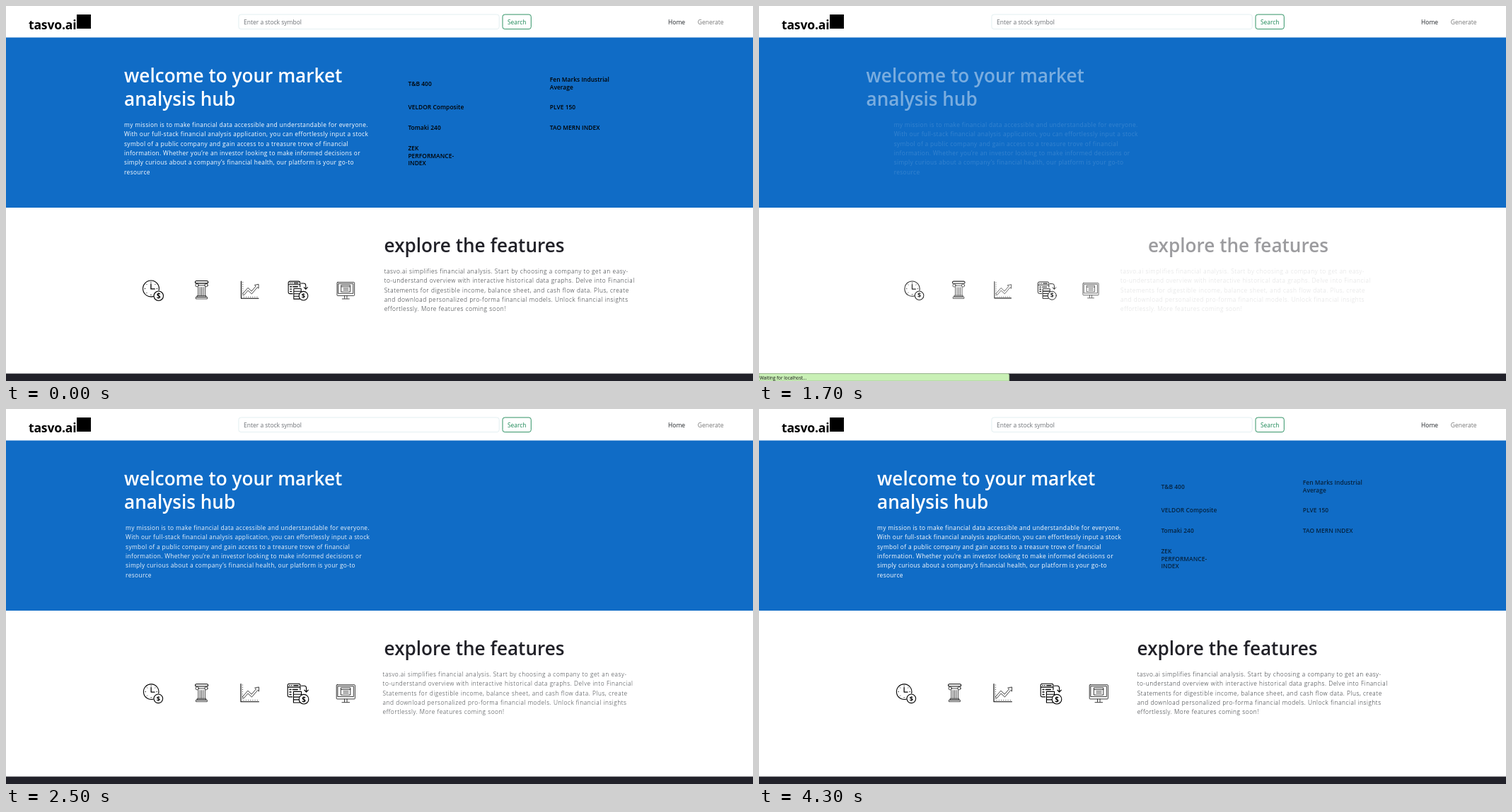
Write an HTML page that moves like this. It is 1056x530 px and loops after 4500 ms.

```html
<!DOCTYPE html>
<html lang="en">
<head>
<meta charset="utf-8">
<title>Market analysis hub</title>
<style>
  html, body { margin: 0; width: 100%; height: 100%; overflow: hidden; background: #fff; }
  svg { display: block; width: 1056px; height: 530px; }
  text { font: 400 8.5px "Open Sans", "Noto Sans", sans-serif; fill: #212529; }
  .brand { font-size: 17.6px; font-weight: 700; letter-spacing: -.2px; fill: #000; }
  .hint { fill: #6c7075; }
  .green { font-size: 8.4px; fill: #198754; }
  .dim { fill: #777; }
  .title { font-size: 26.15px; font-weight: 600; fill: #fff; }
  .dark { fill: #212128; }
  .lead { font-size: 8.4px; letter-spacing: .34px; fill: #fff; }
  .body { font-size: 8.4px; font-weight: 300; letter-spacing: .555px; }
  .label { font-size: 8.4px; font-weight: 600; letter-spacing: .06px; fill: #000; }
  .status { font-size: 6.4px; fill: #111; }
  #icons { fill: none; stroke: #000; stroke-width: 1.1; stroke-linejoin: round; stroke-linecap: round; }
  #icons .thin { stroke-width: .75; }
  #icons .white { fill: #fff; }
  #icons text { font-size: 9.5px; font-weight: 700; fill: #000; stroke: none; text-anchor: middle; }
</style>
</head>
<body>
<svg viewBox="0 0 1056 530">
  <rect width="1056" height="530" fill="#fff"/>
  <rect y="44.5" width="1056" height="240.5" fill="#106cc6"/>
  <rect y="519.5" width="1056" height="10.5" fill="#212129"/>

  <g id="nav">
    <rect x="100" y="12" width="20" height="20" fill="#000"/>
    <rect x="328.9" y="12" width="368.3" height="20.6" rx="3.2" fill="#fff" stroke="#dcebee" stroke-width=".8"/>
    <rect x="702" y="12" width="40.3" height="20.6" rx="3.2" fill="#fff" stroke="#198754" stroke-width=".9"/>
  </g>

  <g id="title"></g>
  <g id="lead"></g>
  <g id="labels"></g>
  <g id="title2"></g>
  <g id="body"></g>

  <g id="icons">
    <g class="icon">
      <path d="M208.4 410.2A11.2 11.2 0 1 1 216 401.8"/>
      <path d="M205 393v7h5.2" stroke-width="1.3"/>
      <path class="thin" d="M205 390.4v1M196.2 399.5h1M212.8 399.5h1M198.8 393.3l.6.6M211.2 393.3l-.6.6M198.8 405.7l.6-.6M205 407.6v1"/>
      <circle cx="215.6" cy="409.6" r="6.6"/>
      <text x="215.6" y="413">$</text>
    </g>
    <g class="icon">
      <path d="M269 388.4h15.2a1.7 1.7 0 0 1 0 3.4H269a1.7 1.7 0 0 1 0-3.4z"/>
      <circle class="thin" cx="270" cy="394.6" r="2.2"/>
      <circle class="thin" cx="283.2" cy="394.6" r="2.2"/>
      <path class="thin" d="M272.2 394.8h8.8M271.6 397v12.2M274.2 397.5v11.7M276.6 397.5v11.7M279 397.5v11.7M281.6 397v12.2"/>
      <path d="M270.3 409.5h12.6v1.9h-12.6zM268.6 411.6h16v2.4h-16z" class="thin"/>
    </g>
    <g class="icon">
      <path d="M332 388.5v25.2h25.4"/>
      <path class="thin" d="M334.4 390v20" stroke-dasharray=".2 3"/>
      <path class="thin" d="M336 411.6h21" stroke-dasharray=".2 3"/>
      <path class="thin" d="M334.3 406.8l7.6-8.6 5.3 5 6.3-7.4-1.8-1.6 5.8-1.2v6l-1.8-1.5-8.2 9.6-5.4-5-5.9 6.6z"/>
    </g>
    <g class="icon">
      <path d="M404.8 406.8h-4a2.2 2.2 0 0 1-2.2-2.2v-13.8a2.2 2.2 0 0 1 2.2-2.2h12.8a2.2 2.2 0 0 1 2.2 2.2v6.2M398.8 393.4h16.8"/>
      <path d="M401.3 391h.2M404 391h.2M407 391h6M401.4 396.6h1.8M405.6 396.6h6.6M401.4 400h1.8M401.4 403.4h1.8" stroke-width="1.5"/>
      <path d="M417.4 391.6h3.8q3 0 3 3v5M421.6 397.4l2.6 2.8 2.6-2.8"/>
      <path class="white" d="M406.6 399.4h10.8v3.8h-10.8zM406.6 403.2h10.8v3.8h-10.8zM406.6 407h9v3.6h-9zM406.6 410.6h8.6v4h-8.6z"/>
      <circle class="white" cx="420.8" cy="410" r="6.6"/>
      <text x="420.8" y="413.4">$</text>
    </g>
    <g class="icon">
      <rect class="thin" x="467.7" y="390.2" width="25.2" height="19.4" rx="1"/>
      <path class="thin" d="M469.7 392.2h21.2v14.2h-21.2z"/>
      <path class="thin" d="M474 394.3h12.6v9.8H474zM474 396.6h12.6M477 399h7M477 401.4h7"/>
      <path class="thin" d="M478.6 409.8v3.6M482 409.8v3.6M475.2 414.2h10.2"/>
    </g>
  </g>

  <g id="status">
    <path d="M0 519.6h351.5q2.3 0 2.3 2.3V530H0z" fill="#c9f0b6" stroke="#8fae83" stroke-width=".6"/>
  </g>
</svg>
<script>
const LOOP = 4500, TICK = 100, LAST = 4300;
const RELOAD = 1500, SHIFT = 27.9;
const $ = id => document.getElementById(id);

function write(id, cls, x, y, step, rows) {
  rows.forEach((row, i) => {
    const el = document.createElementNS('http://www.w3.org/2000/svg', 'text');
    el.setAttribute('class', cls);
    el.setAttribute('x', x);
    el.setAttribute('y', y + i * step);
    el.textContent = row;
    $(id).appendChild(el);
  });
}

write('nav', 'brand', 32, 33, 0, ['tasvo.ai']);
write('nav', 'hint', 336, 25.7, 0, ['Enter a stock symbol']);
write('nav', 'green', 709, 25.7, 0, ['Search']);
write('nav', '', 936, 25.7, 0, ['Home']);
write('nav', 'dim', 977.8, 25.7, 0, ['Generate']);
write('title', 'title', 167, 107.8, 33.5, ['welcome to your market', 'analysis hub']);
write('lead', 'lead', 167, 170.7, 13.4, [
  'my mission is to make financial data accessible and understandable for everyone.',
  'With our full-stack financial analysis application, you can effortlessly input a stock',
  'symbol of a public company and gain access to a treasure trove of financial',
  'information. Whether you\u2019re an investor looking to make informed decisions or',
  'simply curious about a company\u2019s financial health, our platform is your go-to',
  'resource'
]);
write('title2', 'title dark', 534.6, 348.2, 0, ['explore the features']);
write('body', 'body', 534.7, 377.8, 13.4, [
  'tasvo.ai simplifies financial analysis. Start by choosing a company to get an easy-',
  'to-understand overview with interactive historical data graphs. Delve into Financial',
  'Statements for digestible income, balance sheet, and cash flow data. Plus, create',
  'and download personalized pro-forma financial models. Unlock financial insights',
  'effortlessly. More features coming soon!'
]);
[
  [568.4, 112.6, 'T&B 400'],
  [768.8, 107.4, 'Fen Marks Industrial', 'Average'],
  [568.4, 146.4, 'VELDOR Composite'],
  [768.8, 146.4, 'PLVE 150'],
  [568.4, 174.9, 'Tomaki 240'],
  [768.8, 174.9, 'TAO MERN INDEX'],
  [568.4, 203.9, 'ZEK', 'PERFORMANCE-', 'INDEX']
].forEach(([x, y, ...rows]) => write('labels', 'label', x, y, 10.6, rows));
write('status', 'status', 1, 528, 0, ['Waiting for localhost...']);

// cubic-bezier(.25, .1, .25, 1)
function ease(u) {
  if (u <= 0) return 0;
  if (u >= 1) return 1;
  let lo = 0, hi = 1, s;
  for (let i = 0; i < 24; i++) {
    s = (lo + hi) / 2;
    const x = .75 * s * (1 - s) + s ** 3;
    if (x < u) lo = s; else hi = s;
  }
  return .3 * s * (1 - s) ** 2 + 3 * s * s * (1 - s) + s ** 3;
}

const zoom = (cx, cy, k) => `translate(${cx} ${cy}) scale(${k}) translate(${-cx} ${-cy})`;

// block, start side, duration
const slides = [['title', -1, 750], ['lead', 1, 1500], ['title2', 1, 750], ['body', -1, 1500]];
const centers = [[208.5, 402.5], [276.6, 401], [344.5, 401], [412.6, 402.5], [480.5, 402]];
const icons = document.querySelectorAll('.icon');

function draw(t) {
  const fresh = t >= RELOAD;
  const enter = d => fresh ? ease((t - RELOAD) / d) : 1;

  for (const [id, side, d] of slides) {
    const p = enter(d);
    $(id).setAttribute('opacity', p);
    $(id).setAttribute('transform', `translate(${side * SHIFT * (1 - p)} 0)`);
  }

  const p = enter(375);
  $('icons').setAttribute('opacity', p);
  $('icons').setAttribute('transform', zoom(344.5, 402, .5 + p / 2));
  const beat = t - (fresh ? 2500 : 1200);
  icons.forEach((el, i) => {
    const k = 1 + .04 * Math.cos(2 * Math.PI * (beat - 900 - 225 * i) / 1800);
    el.setAttribute('transform', zoom(...centers[i], k));
  });

  $('labels').setAttribute('opacity', fresh ? ease((t - 4000) / 750) : 1);
  $('status').setAttribute('visibility', t >= 900 && t < 2000 ? 'visible' : 'hidden');
}

const start = performance.now();
function frame() {
  const t = (performance.now() - start) % LOOP;
  draw(Math.min(Math.floor(t / TICK) * TICK, LAST));
  requestAnimationFrame(frame);
}
frame();
</script>
</body>
</html>
```
